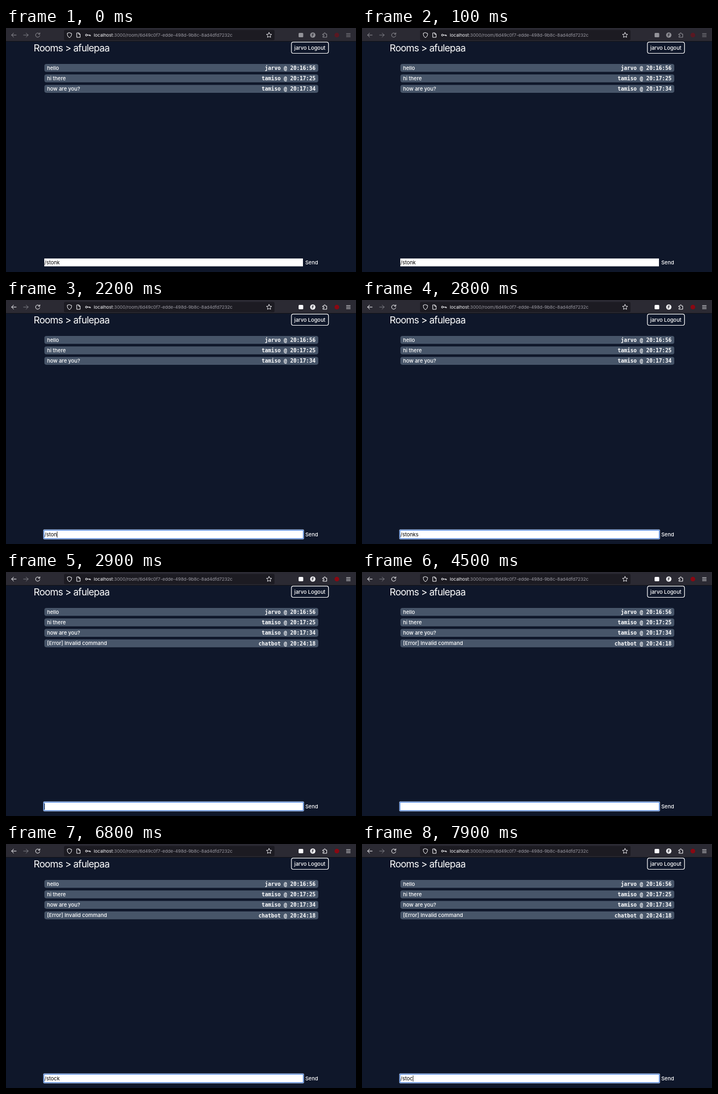
Animation of 640 by 448 pixels, one loop 8 s. Source, as an HTML page:

```html
<!DOCTYPE html>
<html lang="en">
<head>
<meta charset="utf-8">
<title>Chat room</title>
<style>
  html, body { margin: 0; width: 100%; height: 100%; overflow: hidden; background: #0f172a; }
  svg { display: block; width: 640px; height: 448px; }
  text { font: 500 9.55px Inter, sans-serif; fill: #fff; white-space: pre; }
  .title { font-size: 17.6px; font-weight: 400; letter-spacing: -.75px; }
  .url { font-size: 8.2px; font-weight: 400; fill: #9c9ba4; }
  .host { fill: #fbfbfe; }
  .meta { font: 700 9.64px "DejaVu Sans Mono", monospace; text-anchor: end; }
  .typed { fill: #000; font-weight: 400; }
  .icon { fill: none; stroke: #fbfbfe; stroke-width: 1; stroke-linecap: round; stroke-linejoin: round; }
</style>
</head>
<body>
<svg viewBox="0 0 640 448">
  <rect width="640" height="448" fill="#0f172a"/>
  <rect width="640" height="24.5" fill="#2b2a33"/>
  <rect y="24" width="640" height=".7" fill="#0c0c0d"/>
  <rect x="106" y="3.5" width="385" height="19" rx="2.5" fill="#1c1b22"/>

  <path class="icon" d="M32 13h8.5m-3.7-3.7 3.7 3.7-3.7 3.7" opacity=".4"/>
  <g id="tools" class="icon">
    <path d="M18.7 13h-8.5m3.7-3.7-3.7 3.7 3.7 3.7"/>
    <path d="M61 10.5a3.9 3.9 0 1 0 .8 3.5M61.9 8.8v2.6h-2.6"/>
    <rect x="535" y="9" width="8.5" height="8" rx="1.5" fill="#fbfbfe" stroke="none"/>
    <circle cx="561" cy="13" r="4.8" fill="#fbfbfe" stroke="none"/>
    <path d="M559.9 15.4v-4.7h2.7m-2.7 2.2h2.3" stroke="#2b2a33" stroke-width="1.1"/>
    <path d="M579.5 11h2v-.9a1.3 1.3 0 0 1 2.6 0v.9h2.4v6h-7v-1.8h1a1.2 1.2 0 0 0 0-2.4h-1z"/>
    <circle cx="605" cy="13" r="4.3" fill="#8a0812" stroke="none"/>
    <path d="M622.5 10.3h7m-7 2.8h7m-7 2.8h7" stroke-width=".9"/>
  </g>
  <g class="icon">
    <path d="M116 8.6l3.9 1.4c.1 3.7-.8 6.2-3.9 7.7-3.1-1.5-4-4-3.9-7.7z"/>
    <path d="M129.7 9h3.6l2.3 2.3v5.8h-5.9zM133 9.2v2.4h2.4"/>
    <path d="M148.8 13h5.6v1.7m-2-1.7v1.4"/>
    <circle cx="147" cy="13" r="1.7"/>
    <path id="star" stroke-width=".9"/>
  </g>
  <text class="url" x="160.5" y="16"><tspan class="host">localhost</tspan>:3000/room/6d49c0f7-edde-498d-9b8c-8ad4dfd7232c</text>

  <text class="title" x="50.6" y="43.2">Rooms &gt; afulepaa</text>
  <rect x="521.9" y="25.9" width="67.8" height="20.6" rx="3.4" fill="none" stroke="#fff" stroke-width="1.2"/>
  <text x="527" y="39.6">jarvo Logout</text>

  <g id="rows"></g>

  <g id="ring">
    <rect x="68.1" y="421.3" width="476.8" height="18.1" rx="2" fill="#dbe4f2"/>
    <rect x="68.8" y="422" width="475.4" height="16.7" rx="1.5" fill="#2f6fd6"/>
  </g>
  <rect x="70" y="423.2" width="473" height="14.4" fill="#fff"/>
  <text id="typed" class="typed" x="70.2" y="434"></text>
  <rect id="caret" y="425" width=".8" height="11.2" fill="#000"/>
  <text x="547.2" y="434">Send</text>
</svg>
<script>
const $ = id => document.getElementById(id);
const LOOP = 8000, FOCUS = 1100, REPLY = 2900;

const messages = [
  ["hello", "jarvo @ 20:16:56"],
  ["hi there", "tamiso @ 20:17:25"],
  ["how are you?", "tamiso @ 20:17:34"],
  ["[Error] Invalid command", "chatbot @ 20:24:18"],
];

// [start ms, input text, caret visible]
const typing = [
  [0, "/stonk", 0], [1100, "/stonk", 1], [1600, "/stonk", 0],
  [1700, "/ston", 1], [1900, "/stonk", 1], [2200, "/ston", 1], [2300, "/ston", 0],
  [2600, "/stonk", 1], [2700, "/stonks", 1], [2800, "/stonks", 0],
  [2900, "", 1], [3400, "", 0], [3900, "", 1], [4500, "", 0], [5100, "", 1], [5600, "", 0],
  [5800, "/", 1], [6000, "/s", 1], [6200, "/st", 1], [6300, "/sto", 1],
  [6500, "/stoc", 1], [6700, "/stock", 1], [6800, "/stock", 0],
  [7200, "/stoc", 1], [7400, "/stoc", 0], [7900, "/stoc", 1],
];

$("rows").innerHTML = messages.map(([body, meta], i) => {
  const y = 65.9 + i * 19.27;
  return `<g><rect x="70.2" y="${y}" width="500.8" height="14.5" rx="3.6" fill="#475569"/>
    <text x="74.9" y="${y + 10.7}">${body}</text>
    <text class="meta" x="566" y="${y + 10.8}">${meta}</text></g>`;
}).join("");
const reply = $("rows").lastElementChild;

const starPoints = Array.from({ length: 10 }, (_, i) => {
  const a = i * Math.PI / 5, r = i % 2 ? 2.4 : 5;
  return `${481 + r * Math.sin(a)} ${13.2 - r * Math.cos(a)}`;
});
$("star").setAttribute("d", `M${starPoints.join("L")}z`);

const show = (el, on) => el.setAttribute("visibility", on ? "visible" : "hidden");

function draw(t) {
  const [, text, caret] = typing.findLast(([start]) => start <= t);
  $("typed").textContent = text;
  $("caret").setAttribute("x", 70.2 + $("typed").getComputedTextLength());
  show($("caret"), caret);
  show($("ring"), t >= FOCUS);
  show(reply, t >= REPLY);
  $("tools").setAttribute("opacity", t < FOCUS ? .5 : 1);
}

const began = performance.now();
function tick() {
  draw((performance.now() - began) % LOOP);
  requestAnimationFrame(tick);
}
tick();
</script>
</body>
</html>
```
